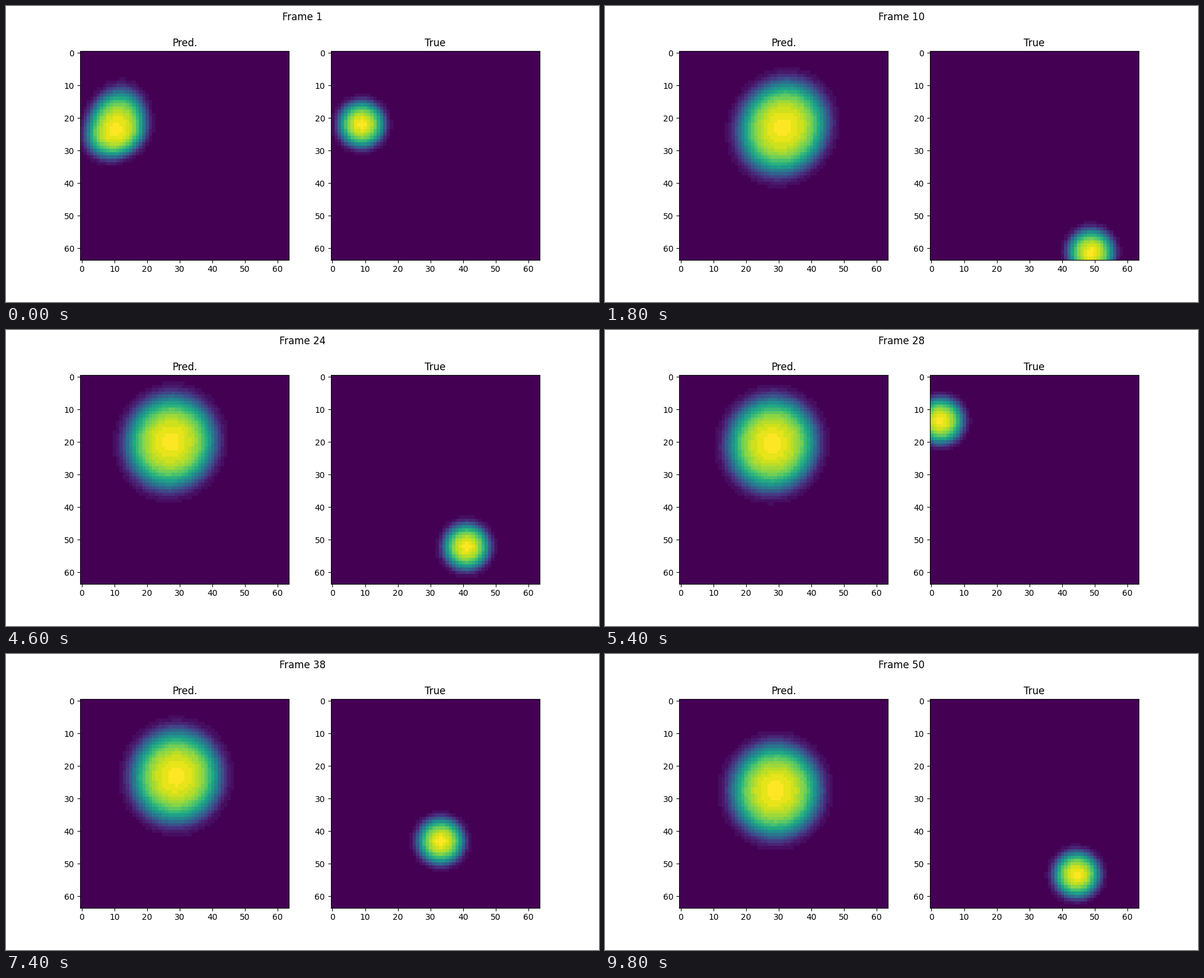
A matplotlib script that plays this animation: 1000 by 500 pixels, repeating every 10 s.

```python
import numpy as np
import matplotlib.pyplot as plt
from matplotlib.animation import FuncAnimation

SIZE = 64
STEPS = 50
SHADES = 28
EDGE = np.log(2 * SHADES)  # falloff exponent where a blob fades to background

# Where the predicted blob rests along its drift: step, x, y
KEYS = [(1, 10.4, 23.8), (7, 26.2, 23.5), (10, 31.2, 23.0), (18, 29.5, 15.6),
        (24, 27.2, 20.0), (33, 28.8, 21.4), (50, 29.0, 27.5)]

plt.rcParams["font.family"] = "DejaVu Sans"
rows, cols = np.mgrid[0:SIZE, 0:SIZE].astype(float)


def fold(u):
    """Bounce a straight run between the two walls."""
    wall = SIZE - 1
    return wall - abs(u % (2 * wall) - wall)


def shade(dist2, core):
    """Rounded peak with a steeper rim, reduced to a few levels."""
    field = np.exp(-core * dist2 - (EDGE - core) * dist2**3)
    return np.round(field / field.max() * SHADES) / SHADES


def true_field(step):
    x = fold(-8.8 + 9.56 * (step - 1))
    y = fold(-22 + 9.647 * (step - 1))
    return shade(((cols - x) ** 2 + (rows - y) ** 2) / 9.4**2, core=1.1)


def pred_field(step):
    steps, xs, ys = zip(*KEYS)
    x, y = np.interp(step, steps, xs), np.interp(step, steps, ys)
    t = step - 1
    young = np.exp(-t / 2.5)  # starts small and egg-shaped, soon settles
    tilt = 0.3 * np.exp(-t / 16)
    dx = (cols - x) / (17.6 - 5.9 * young)
    dy = (rows - y) / (18.4 - 7.6 * young)
    dy = np.where(dy < 0, dy / (1 + 0.45 * young), dy)
    return shade(dx**2 + dy**2 + tilt * dx * dy, core=0.75)


fig, axes = plt.subplots(1, 2, figsize=(10, 5), dpi=100)
heading = fig.suptitle("Frame 1")
fields = (pred_field, true_field)
images = []
for ax, name, field in zip(axes, ("Pred.", "True"), fields):
    ax.set_title(name)
    images.append(ax.imshow(field(1), cmap="viridis", vmin=0, vmax=1,
                            interpolation="nearest"))


def update(i):
    step = i + 1
    heading.set_text(f"Frame {step}")
    for image, field in zip(images, fields):
        image.set_data(field(step))
    return [heading, *images]


anim = FuncAnimation(fig, update, frames=STEPS, interval=200,
                     repeat=True, repeat_delay=0, blit=False)
plt.show()
```
